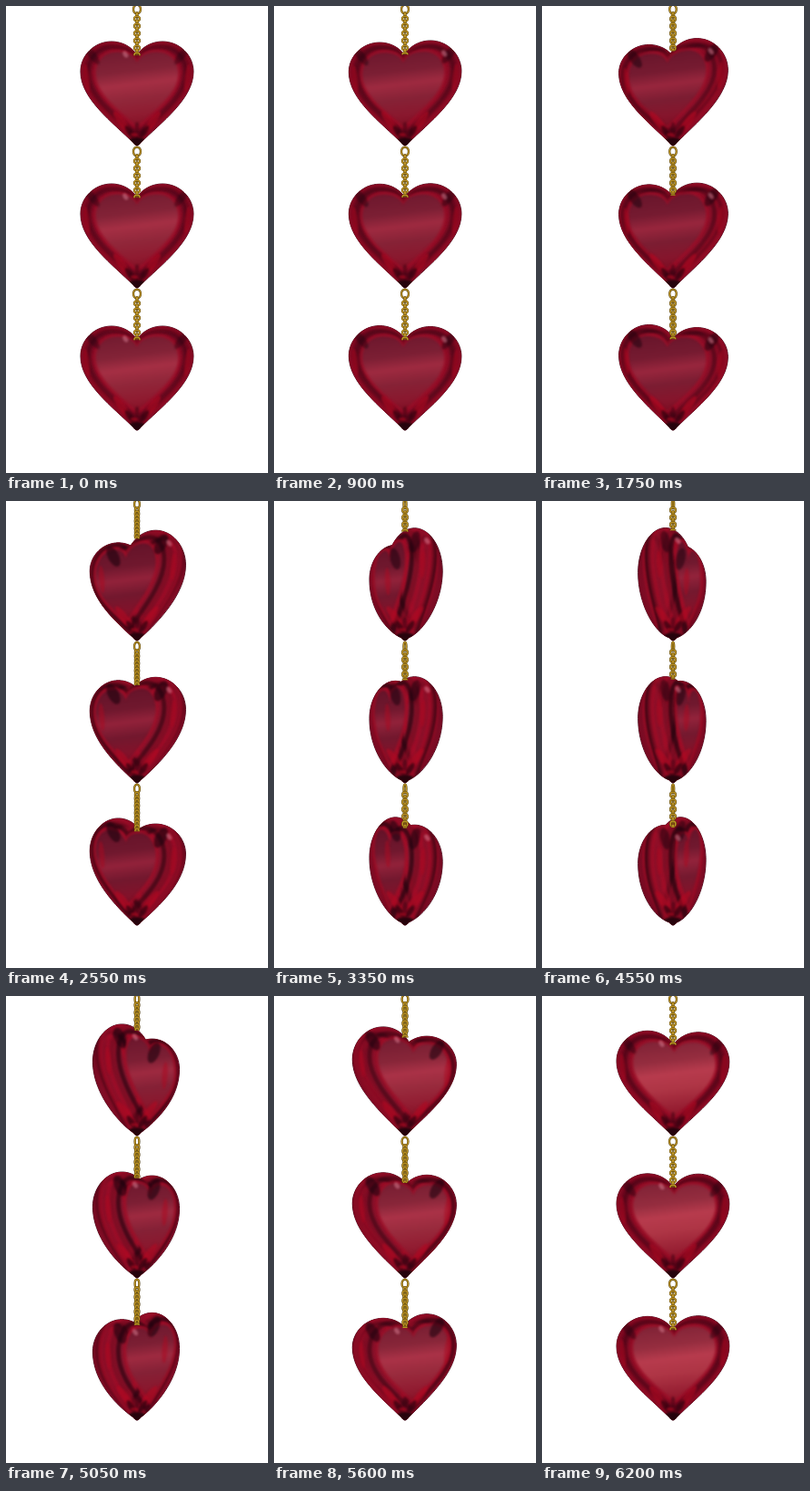
Recreate the animation shown at these times as an HTML page with a canvas. Size 288 by 512 pixels, loop 6.25 s.

```html
<!DOCTYPE html>
<html lang="en">
<head>
<meta charset="utf-8">
<title>Turning hearts</title>
<style>
html, body { margin: 0; width: 100%; height: 100%; overflow: hidden; background: #fff; }
canvas { display: block; }
</style>
</head>
<body>
<canvas id="stage" width="288" height="512"></canvas>
<script>
const ctx = document.getElementById('stage').getContext('2d');
const LOOP = 6250, STEP = 50, TIP = 81, SPACING = 156, DEPTH = 18;
const { sin, cos, abs, sqrt, PI } = Math;

// Turn of the string: time in ms, angle in degrees
const TURN = [[0, 0], [1000, 7], [1750, 20], [2550, 43], [3350, 68], [4100, 90],
  [4550, 107], [5050, 126], [5850, 160], [6250, 178]];

// tipY: lowest point; lift: how far perspective raises the near lobe
const HEARTS = [{ tipY: 153, lift: 10 }, { tipY: 309, lift: 2.5 }, { tipY: 465, lift: -4.5 }];

// Slices through the glass, from the middle out to the face
const SLICE_COLOURS = ['#8c1029', '#a00d28', '#7c0c22', '#2c0410', '#a50e28'];
const SLICE = new Path2D('M0-19C6-30 18-33 30-33C50-33 62-18 62 0C62 30 26 56 0 79' +
  'C-26 56-62 30-62 0C-62-18-50-33-30-33C-18-33-6-30 0-19Z');

const mix = (a, b, p) => a + (b - a) * p;

function turnAt(t) {
  const last = TURN.length - 1;
  const slope = i => {
    const a = TURN[Math.max(i - 1, 0)], b = TURN[Math.min(i + 1, last)];
    return (b[1] - a[1]) / (b[0] - a[0]);
  };
  let i = 0;
  while (i < last - 1 && t >= TURN[i + 1][0]) i++;
  const [t0, v0] = TURN[i], [t1, v1] = TURN[i + 1];
  const h = t1 - t0, u = (t - t0) / h, r = 1 - u;
  const angle = v0 * (1 + 2 * u) * r * r + v1 * u * u * (3 - 2 * u) +
    h * u * r * (slope(i) * r - slope(i + 1) * u);
  return angle * PI / 180;
}

// azimuth 0 faces the viewer, +-90 degrees is seen from the front of the heart
function makeLobe(azimuth, lift) {
  const near = cos(azimuth), side = sin(azimuth), rise = -lift * near;
  const lobe = {
    near, side, k: 28 * side, w: (27 + 7 * abs(side)) * (1 + 0.04 * near),
    top: -33 + rise, mid: rise * 0.5 + 15 * near ** 6, round: near ** 4
  };
  lobe.path = new Path2D();
  lobe.path.moveTo(lobe.k, lobe.top);
  traceDown(lobe.path, lobe);
  traceUp(lobe.path, lobe);
  return lobe;
}

function edge({ k, mid, top, round }, w) {
  const x = k + w;
  return {
    x, y: mid + mix(30, 35, round), bend: mid - 0.55 * (mid - top),
    cx: x * mix(0.42, 0.55, round), cy: mix(56, 76, round)
  };
}

function traceDown(path, lobe) {
  const { k, w, top, mid } = lobe, { x, y, bend, cx, cy } = edge(lobe, w);
  path.bezierCurveTo(k + 0.55 * w, top, x, bend, x, mid);
  path.bezierCurveTo(x, y, cx, cy, 4, 78);
  path.quadraticCurveTo(2, TIP, 0, TIP);
}

function traceUp(path, lobe) {
  const { k, w, top, mid } = lobe, { x, y, bend, cx, cy } = edge(lobe, -w);
  path.quadraticCurveTo(-2, TIP, -4, 78);
  path.bezierCurveTo(cx, cy, x, y, x, mid);
  path.bezierCurveTo(x, bend, k - 0.55 * w, top, k, top);
  path.closePath();
}

function blob(x, y, rx, ry, tilt, colour) {
  ctx.fillStyle = colour;
  ctx.beginPath();
  ctx.ellipse(x, y, rx, ry, tilt, 0, 2 * PI);
  ctx.fill();
}

function paintBody(half) {
  ctx.save();
  ctx.scale(half / 62, 1);
  const glow = ctx.createRadialGradient(0, 10, 4, 0, 14, 74);
  glow.addColorStop(0, '#861a32');
  glow.addColorStop(0.55, '#8a0f28');
  glow.addColorStop(0.8, '#760a22');
  glow.addColorStop(1, '#3c0814');
  ctx.fillStyle = glow;
  ctx.fillRect(-70, -60, 140, 160);
  ctx.restore();
}

// Heart-shaped slice at depth u: -1 is the hidden face, 1 the visible one
function sliceAt(u, angle, lift) {
  const size = sqrt(1 - 0.45 * u * u), facing = cos(angle) < 0 ? -1 : 1;
  const path = new Path2D();
  path.addPath(SLICE, new DOMMatrix([
    size * cos(angle), -size * lift * sin(angle) / 40, 0, size,
    -DEPTH * u * facing * sin(angle), 9 * (1 - size)
  ]));
  return path;
}

function faceSheen(t) {
  const light = t < 2500 ? mix(0.5, 0, t / 2500) : Math.max(0, (t - 4500) / 1750);
  const tone = (dark, bright) =>
    `rgb(${dark.map((v, i) => Math.round(mix(v, bright[i], light))).join()})`;
  const sheen = ctx.createLinearGradient(-6, -30, 6, 66);
  sheen.addColorStop(0, tone([98, 18, 40], [124, 32, 52]));
  sheen.addColorStop(0.3, tone([112, 24, 46], [150, 46, 64]));
  sheen.addColorStop(0.45, tone([146, 34, 58], [184, 60, 78]));
  sheen.addColorStop(0.62, tone([114, 24, 46], [176, 54, 70]));
  sheen.addColorStop(0.8, tone([130, 18, 42], [156, 36, 54]));
  sheen.addColorStop(1, tone([112, 10, 30], [140, 14, 36]));
  return sheen;
}

function paintSlices(angle, lift, t) {
  const turned = abs(sin(angle));
  ctx.lineWidth = 5;
  for (let i = -4; i <= 4; i++) {
    ctx.strokeStyle = SLICE_COLOURS[abs(i)];
    ctx.globalAlpha = 0.2 + 0.6 * turned;
    ctx.stroke(sliceAt(i / 4, angle, lift));
  }
  const face = sliceAt(1, angle, lift);
  ctx.globalAlpha = 1;
  ctx.fillStyle = faceSheen(t);
  ctx.fill(face);
  ctx.strokeStyle = 'rgba(160,14,40,.5)';
  ctx.lineWidth = 2;
  ctx.stroke(face);
}

// Dark reflection on the shoulder of a lobe, with a red glint below it
function paintShoulder({ k, w, top, near, side }) {
  const x = k + w * side * abs(side) ** 3 * 0.62;
  blob(x, top + 15, 4 + 4 * abs(near * side), 12, side * 0.65,
    `rgba(28,2,14,${0.4 + 0.4 * abs(side * near)})`);
  blob(k + w * side * 0.8, top + 40, 3, 15, side * 0.12, 'rgba(172,8,32,.5)');
}

function paintTip(half) {
  const spread = half / 62;
  for (const dir of [-1, 1]) {
    blob(dir * 17 * spread, 55, 4, 14, dir * 0.65, 'rgba(178,8,34,.6)');
    blob(dir * 8 * spread, 66, 3, 8, dir * 0.6, 'rgba(46,2,14,.7)');
  }
  blob(0, 62, 2.5, 7, 0, 'rgba(70,4,20,.6)');
  blob(-3, 69, 4, 2, 0, 'rgba(160,8,30,.7)');
  blob(0, 78, 11, 6, 0, 'rgba(28,2,10,.9)');
}

function drawHeart({ tipY, lift }, angle, t) {
  const lobes = [makeLobe(PI / 2 - angle, lift), makeLobe(-PI / 2 - angle, lift)]
    .sort((a, b) => a.near - b.near);
  const [far, near] = lobes;
  const shape = new Path2D(far.path);
  shape.addPath(near.path);
  const half = abs(near.k) + near.w;

  ctx.save();
  ctx.translate(144, tipY - TIP);
  ctx.save();
  ctx.clip(shape);
  paintBody(half);
  ctx.filter = 'blur(1px)';
  paintSlices(angle, lift, t);
  lobes.forEach(paintShoulder);
  paintTip(half);
  blob(near.k + near.w * 0.45, near.top + 14, 2.5, 4, -0.6, 'rgba(220,130,150,.5)');
  ctx.filter = 'none';
  ctx.restore();

  // Rim without the hidden edges inside the body
  ctx.globalCompositeOperation = 'destination-over';
  ctx.strokeStyle = '#4a1424';
  ctx.lineWidth = 1;
  ctx.stroke(shape);
  ctx.restore();

  const reach = sqrt(1 - (near.k / near.w) ** 2);
  return tipY - TIP + near.mid - (near.mid - near.top) * reach + 1;
}

function drawLink(y, rx, ry) {
  for (const [colour, width] of [['#5c460c', 2.4], ['#c09626', 1.3]]) {
    ctx.strokeStyle = colour;
    ctx.lineWidth = width;
    ctx.beginPath();
    ctx.ellipse(144, y, Math.max(rx, 0.4), ry, 0, 0, 2 * PI);
    ctx.stroke();
  }
}

function drawChain(start, end, angle) {
  const flat = abs(cos(angle)), turned = abs(sin(angle));
  ctx.save();
  ctx.beginPath();
  ctx.rect(130, start, 28, end - start);
  ctx.clip();
  drawLink(start + 6.5, 4 * flat, 4.8);
  for (let i = 0; i < 14; i++) {
    drawLink(start + 13 + 4 * i, 3 * (i % 2 ? flat : turned), 2.8);
  }
  ctx.restore();
}

function render(t) {
  const angle = turnAt(t);
  ctx.clearRect(0, 0, 288, 512);
  for (const heart of HEARTS) {
    const end = drawHeart(heart, angle, t);
    drawChain(heart.tipY - SPACING, end, angle);
  }
}

const begin = performance.now();
function tick() {
  const t = (performance.now() - begin) % LOOP;
  render(Math.floor(t / STEP) * STEP);
  requestAnimationFrame(tick);
}
tick();
</script>
</body>
</html>
```
